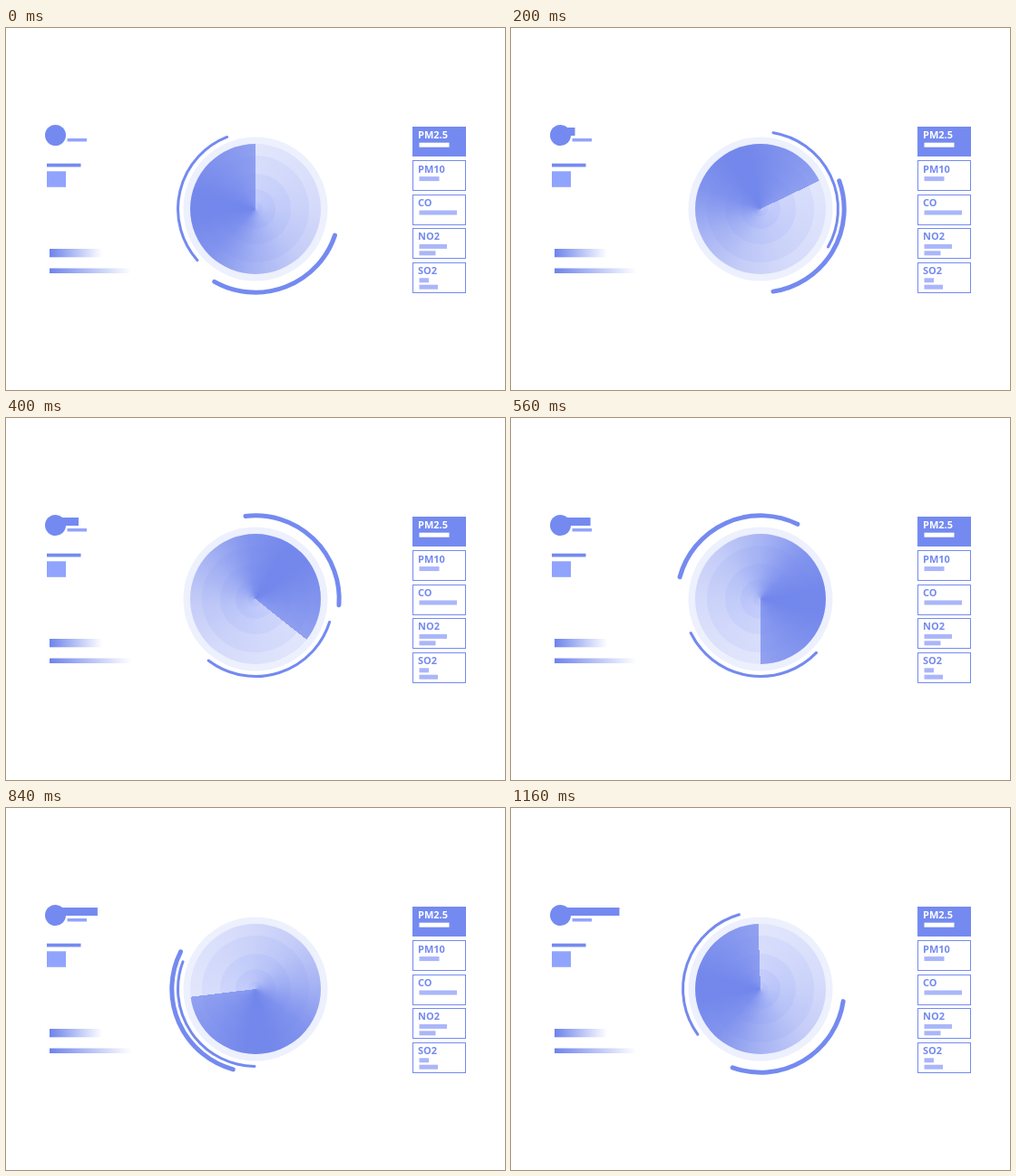
These frames come from a looping animation (550 px wide and 400 px high, 1200 ms). An HTML page:

```html
<!DOCTYPE html>
<html lang="en">
<head>
<meta charset="utf-8">
<title>Air quality gauge</title>
<style>
html, body { margin: 0; width: 100%; height: 100%; overflow: hidden; background: #fff; }
svg { position: absolute; left: 0; top: 0; }
text { font: 700 11px "Open Sans", "Noto Sans", sans-serif; }
#sweep {
  position: absolute; left: 203px; top: 128px; width: 144px; height: 144px; border-radius: 50%;
}
</style>
</head>
<body>
<svg width="550" height="400" viewBox="0 0 550 400" fill="#748af0">
  <defs>
    <linearGradient id="fade">
      <stop offset="0" stop-color="#6d83ec"/>
      <stop offset="1" stop-color="#fff"/>
    </linearGradient>
  </defs>
  <rect id="bar" x="56" y="110" height="9"/>
  <circle cx="54.5" cy="118.5" r="11.5"/>
  <rect x="67.5" y="122" width="21.5" height="3.5" fill="#92a4fb"/>
  <rect x="45" y="149.7" width="37.5" height="3.8"/>
  <rect x="45" y="158.3" width="21" height="17.5" fill="#90a4fe"/>
  <rect x="48" y="244" width="58" height="9.3" fill="url(#fade)"/>
  <rect x="48" y="265.5" width="90" height="5.5" fill="url(#fade)"/>
  <g id="rings"></g>
  <g fill="none" stroke="#748af0" stroke-linecap="round">
    <path id="thin" stroke-width="3"/>
    <path id="thick" stroke-width="5"/>
  </g>
  <g id="cards"></g>
</svg>
<div id="sweep"></div>
<script>
const LOOP = 1200, STEP = 40, CX = 275, CY = 200;
const $ = id => document.getElementById(id);

$('rings').innerHTML = [[79.5, .13], [72, .09], [59, .1], [39, .1], [22, .1], [8, .08]]
  .map(([r, a]) => `<circle cx="${CX}" cy="${CY}" r="${r}" fill-opacity="${a}"/>`).join('');

// label, widths of the bars below it
const cards = [['PM2.5', 33], ['PM10', 22], ['CO', 41.5], ['NO2', 30.5, 18], ['SO2', 10.5, 20.5]];
$('cards').innerHTML = cards.map(([label, ...bars], i) => {
  const y = 109 + i * 37.4, top = Math.round(y) + .5, on = i === 0;
  return `<rect x="448.5" y="${top}" width="58" height="${on ? 32 : 33}" stroke="#748af0" fill="${on ? '#748af0' : '#fff'}"/>
    <text x="454" y="${y + 13.1}" fill="${on ? '#fff' : '#748af0'}">${label}</text>` +
    bars.map((w, j) =>
      `<rect x="455.5" y="${y + 17.7 + j * 7.4}" width="${w}" height="5" fill="${on ? '#fff' : '#aab6f9'}"/>`).join('');
}).join('');

// opacity of the sweep by degrees clockwise, ending at its leading edge
const stops = [[0, 0], [45, .05], [90, .12], [135, .25], [180, .5], [225, .84], [262, .96], [285, .96], [325, .83], [360, .7]]
  .map(([d, a]) => `rgba(111,132,235,${a}) ${d}deg`).join(',');

// piecewise linear value through [time, value] keys
function track(keys, t) {
  let i = 1;
  while (i < keys.length - 1 && t > keys[i][0]) i++;
  const [t0, a] = keys[i - 1], [t1, b] = keys[i];
  return a + (b - a) * (t - t0) / (t1 - t0);
}

// arc around the dial; degrees run clockwise from the top
function arc(r, mid, span) {
  const at = deg => {
    const q = deg * Math.PI / 180;
    return `${CX + r * Math.sin(q)} ${CY - r * Math.cos(q)}`;
  };
  return `M${at(mid - span / 2)}A${r} ${r} 0 0 1 ${at(mid + span / 2)}`;
}

const sweepKeys = [[0, 0], [560, 180], [1160, 358]];
const thinKeys = [[0, 283.5], [320, 509], [1160, 649]];
const thickKeys = [[0, 158.9], [233, 114.5], [600, -41.2], [1160, -211]];

function draw(now) {
  const t = Math.floor(now % LOOP / STEP) * STEP;
  $('sweep').style.background = `conic-gradient(from ${track(sweepKeys, t)}deg, ${stops})`;
  $('thin').setAttribute('d', arc(85.5, track(thinKeys, t), 110));
  $('thick').setAttribute('d', arc(92.2, track(thickKeys, t), 101));
  const end = t < 1160 ? 61 + t * .0475 : 119.5;
  $('bar').setAttribute('width', end - 56);
}

let start;
function tick(now) {
  start ??= now;
  draw(now - start);
  requestAnimationFrame(tick);
}
draw(0);
requestAnimationFrame(tick);
</script>
</body>
</html>
```
